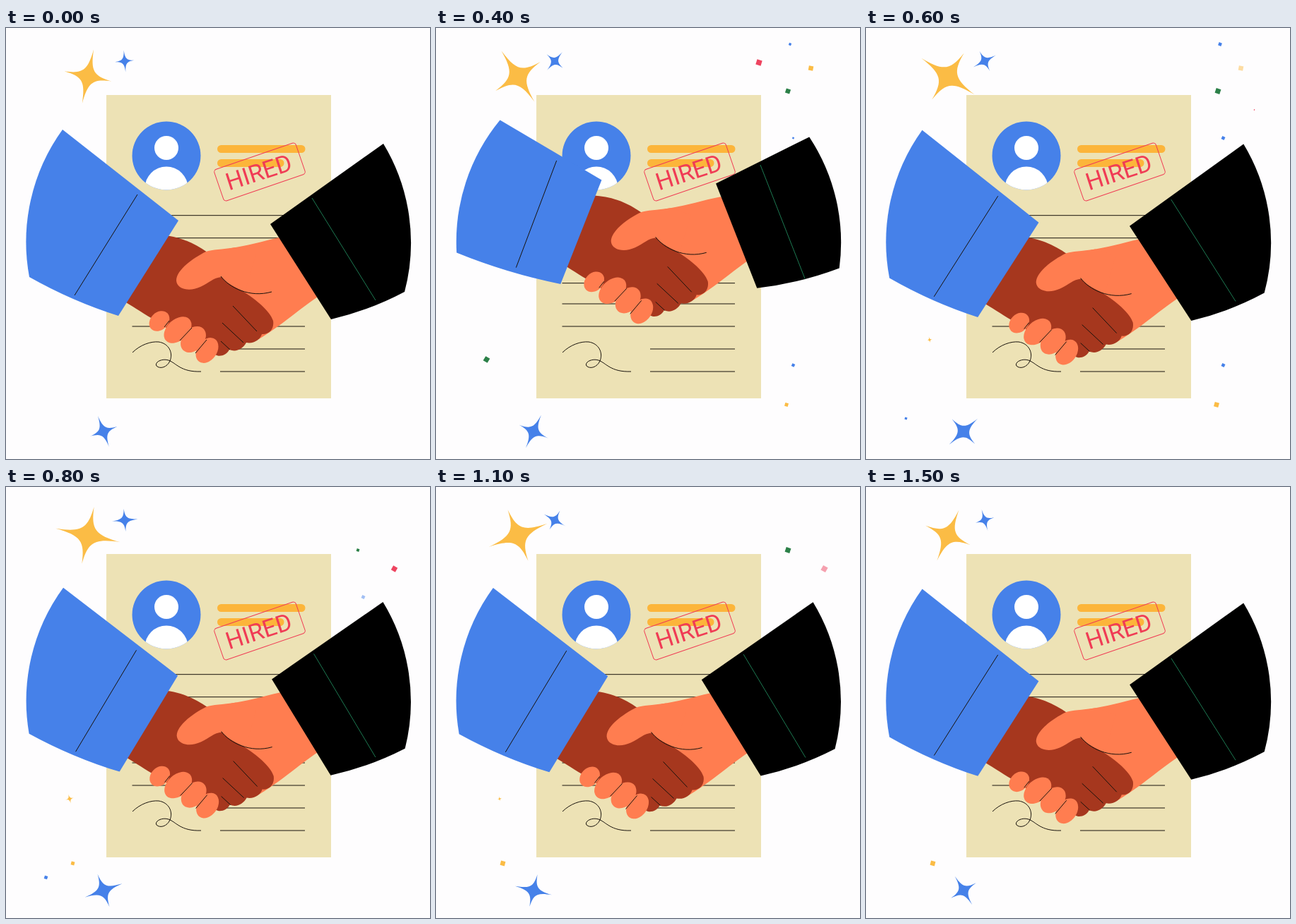
Animation of 600 by 611 pixels, one loop 1600 ms. Source, as an HTML page:

```html
<!DOCTYPE html>
<html lang="en">
<head>
<meta charset="utf-8">
<title>Hired</title>
<style>
  html, body { margin: 0; width: 100%; height: 100%; overflow: hidden; background: #fefdfe; }
  svg { display: block; width: 600px; height: 611px; }
  .ink { fill: none; stroke: #18120c; stroke-width: 1; }
  .dark { fill: #a6371e; }
  .skin { fill: #ff7d50; }
  .bar { stroke: #fcb53a; stroke-width: 11; stroke-linecap: round; }
</style>
</head>
<body>
<svg viewBox="0 0 600 611">
  <clipPath id="disc"><circle cx="227" cy="181" r="48.5"/></clipPath>

  <!-- document -->
  <path fill="#ede2b5" d="M142 95H460V525H142z"/>
  <g clip-path="url(#disc)">
    <circle cx="227" cy="181" r="49" fill="#4681e9"/>
    <circle cx="227" cy="170" r="17" fill="#fff"/>
    <circle cx="227" cy="227" r="30.5" fill="#fff"/>
  </g>
  <path class="bar" d="M304.5 171.5H418M304.5 191.5H388"/>
  <g transform="translate(359 204)">
    <rect x="-61" y="-23.5" width="122" height="47" rx="4" fill="none" stroke="#f03c55" transform="rotate(-19)"/>
    <text transform="translate(-1.5 0) rotate(-18)" y="12.2" text-anchor="middle" fill="#f03c55"
      font-family="Roboto, sans-serif" font-size="34">HIRED</text>
  </g>
  <path id="rules" class="ink"/>
  <path class="ink" d="M179 460C190 449 205 444 216 445C230 447 237 460 232 472C228 481 218 484 213 479C210 474 220 468 230 471C241 475 247 488 276 487"/>

  <g id="hands">
    <path class="skin" d="M262 345C275 322 300 315 325 311C350 307 370 300 396 295L445 330L454 373C420 393 400 415 358 441L300 400z"/>
    <path class="dark" d="M215 293C245 295 265 304 285 318L338 375C352 384 373 400 378 415C380 427 372 435 362 434C360 442 350 448 340 446C335 455 326 460 316 456C312 464 302 467 296 463L250 440L207 412C190 402 180 395 160 383z"/>
    <path class="skin" d="M283 317C265 326 241 343 241 358C242 371 260 374 275 367C288 361 293 354 305 353C316 366 328 368 338 375L354 320L325 311C305 314 292 314 283 317z"/>
    <path class="ink" d="M304 352C316 368 345 383 376 374M321 394L355 430M306 418L336 446M304 444L317 456"/>
    <g class="skin">
      <ellipse rx="16" ry="12.5" transform="translate(217 415.5) rotate(-45)"/>
      <ellipse rx="22.5" ry="15" transform="translate(243 428) rotate(-42)"/>
      <ellipse rx="21" ry="15" transform="translate(265 441.5) rotate(-48)"/>
      <ellipse rx="19.5" ry="14" transform="translate(284.5 457) rotate(-55)"/>
    </g>
    <path class="ink" d="M231 415L224 424M263 425L246 443M284 442L268 461"/>
  </g>

  <path id="leftSleeve" fill="#4681e9"/>
  <path id="leftSeam" class="ink"/>
  <path id="rightSleeve"/>
  <path id="rightSeam" fill="none" stroke="#1d7a52"/>
  <g id="sparks"></g>
</svg>
<script>
const LOOP = 1600, STEP = 100, SHAKE = 600, LIFE = 600;
const YELLOW = '#fbbc45', BLUE = '#4681e9', RED = '#ee4460', GREEN = '#2c8048';
const SIZE = { [YELLOW]: 6.5, [BLUE]: 4.5, [RED]: 7.5, [GREEN]: 7 };
const $ = id => document.getElementById(id);
const clamp = v => Math.max(0, Math.min(1, v));

// One upward shake, then a small decaying sway
function lift(t) {
  if (t < SHAKE) return Math.sin(Math.PI * (t / SHAKE) ** 1.3);
  const q = (t - SHAKE) / (LOOP - SHAKE);
  return .035 - .08 * Math.cos(2 * Math.PI * q ** .6);
}

// Resting and raised poses: shoulder, two cuff corners, elbow, two seam ends
const arms = [
  { name: 'left', side: 1,
    rest: [[80, 144], [244, 273], [159, 408], [33, 353], [186, 236], [97, 379]],
    up: [[91, 130], [234, 213], [177, 361], [29, 317], [170, 186], [114, 338]] },
  { name: 'right', side: -1,
    rest: [[534, 164], [374, 278], [460, 413], [564, 374], [433, 241], [523, 386]],
    up: [[528, 154], [397, 218], [454, 367], [571, 339], [460, 192], [522, 354]] }
];

function drawArm({ name, side, rest, up }, u) {
  const [shoulder, top, bottom, elbow, seamTop, seamEnd] =
    rest.map((p, i) => p.map((v, k) => v + (up[i][k] - v) * u));
  const sag = [(bottom[0] + elbow[0]) / 2 - 2 * side, (bottom[1] + elbow[1]) / 2 + 7];
  $(name + 'Sleeve').setAttribute('d',
    `M${shoulder}L${top}L${bottom}Q${sag} ${elbow}A272 272 0 0 ${side > 0 ? 1 : 0} ${shoulder}z`);
  $(name + 'Seam').setAttribute('d', `M${seamTop}L${seamEnd}`);
}

// x, y, colour, first angle, turning direction, radius
const stars = [
  [116, 68.5, YELLOW, 12, -1, 39],
  [168, 47, BLUE, -5, 1, 15.5],
  [138, 572, BLUE, -20, 1, 23.5]
];

// x, y, colour, start time
const confetti = [
  [457, 49, RED, 0], [530.5, 57, YELLOW, 50], [501, 23, BLUE, 200],
  [498, 89.5, GREEN, 150], [498, 89.5, GREEN, 650], [505.5, 156, BLUE, 250],
  [549.5, 116, RED, 550], [71.5, 470, GREEN, 0], [505.5, 478, BLUE, 150],
  [496, 534, YELLOW, 200], [56.5, 553.5, BLUE, 400],
  [94.5, 533.5, YELLOW, 600], [94.5, 533.5, YELLOW, 1000]
];

function star(x, y, color, angle, v) {
  const h = v * .88, a = v * .05, b = v * .2;
  return `<path fill="${color}" transform="translate(${x} ${y}) rotate(${angle})"
    d="M0 ${-v}C${a} ${-b} ${b} ${-a} ${h} 0C${b} ${a} ${a} ${b} 0 ${v}C${-a} ${b} ${-b} ${a} ${-h} 0C${-b} ${-a} ${-a} ${-b} 0 ${-v}z"/>`;
}

function square([x, y, color, start], t) {
  const age = t - start;
  if (age <= 0 || age >= LIFE) return '';
  const s = SIZE[color] * clamp(age / 270);
  return `<rect x="${-s / 2}" y="${-s / 2}" width="${s}" height="${s}" fill="${color}"
    opacity="${clamp((LIFE - age) / 100)}" transform="translate(${x} ${y}) rotate(${x % 40})"/>`;
}

function draw(t) {
  const u = lift(t), turn = 180 * t / LOOP;
  $('hands').setAttribute('transform', `translate(${7 * u} ${-58 * u})`);
  arms.forEach(arm => drawArm(arm, u));
  const swell = 1 + .2 * Math.sin(Math.PI * t / LOOP) ** 2;
  const twinkle = 7 * Math.sin(Math.PI * clamp((t - 400) / 850));
  $('sparks').innerHTML = star(90, 442, YELLOW, -15, twinkle) +
    stars.map(([x, y, color, angle, dir, r]) => star(x, y, color, angle + dir * turn, r * swell)).join('') +
    confetti.map(c => square(c, t)).join('');
}

const rule = (x, y) => `M${x} ${y}H423`;
$('rules').setAttribute('d', [0, 1, 2, 3].map(i =>
  rule(178.5, 265.7 + 32 * i) + rule(i < 2 ? 178.5 : 303, 391 + 32 * i)).join(''));

const begin = performance.now();
(function tick() {
  const t = Math.max(0, performance.now() - begin) % LOOP;
  draw(Math.floor(t / STEP) * STEP);
  requestAnimationFrame(tick);
})();
</script>
</body>
</html>
```
